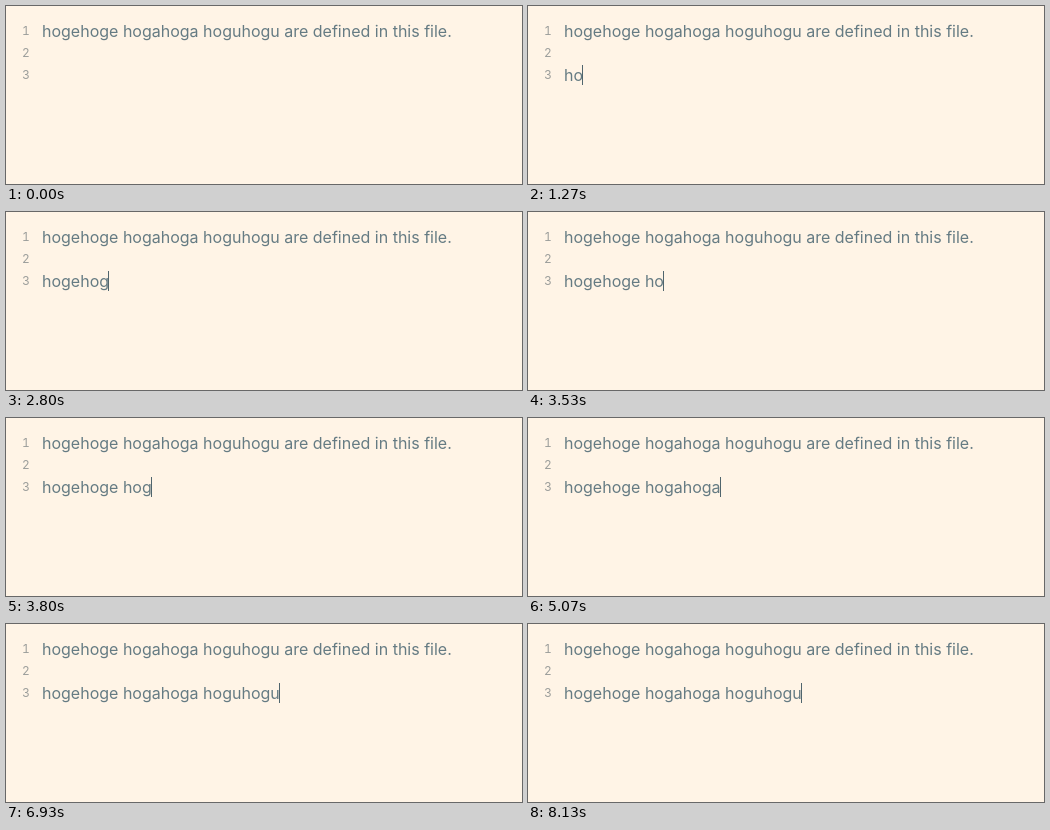
An HTML page that plays this animation: 516 px wide and 178 px high, repeating every 8.59 s.

```html
<!DOCTYPE html>
<html lang="en">
<head>
<meta charset="utf-8">
<title>Word completion in an editor</title>
<style>
  html, body { margin: 0; width: 100%; height: 100%; overflow: hidden; background: #fff4e6; }
  #stage {
    position: relative; width: 516px; height: 178px; overflow: hidden;
    background: #fff4e6; color: #657b83;
    font: 16px/22px Inter, sans-serif;
  }
  #stage > * { position: absolute; }
  .line { left: 36px; white-space: pre; }
  .number {
    left: 10px; width: 20px; text-align: center; color: #9c9e9b;
    font-size: 12px; font-variant-numeric: tabular-nums;
  }
  #caret { top: 59px; width: 1px; height: 20px; background: #50656d; }
  #popup {
    top: 84px; width: 149px; height: 240px; overflow: hidden;
    border: 1px solid #96938c; border-radius: 4px;
    background: #fff4e6; box-shadow: 0 1px 4px rgba(60, 50, 40, .25);
  }
  .item { height: 34px; line-height: 34px; padding-left: 34px; margin-right: 10px; }
  .item:first-child { background: #efe6d8; }
  #bar { position: absolute; top: 0; right: 0; width: 10px; height: 200px; border-radius: 4px; background: #d8cdc1; }
</style>
</head>
<body>
<div id="stage">
  <div class="number" style="top:14px">1</div>
  <div class="number" style="top:36px">2</div>
  <div class="number" style="top:58px">3</div>
  <div class="line" style="top:14px">hogehoge hogahoga hoguhogu are defined in this file.</div>
  <div class="line" style="top:58px" id="typed"></div>
  <div id="caret"></div>
  <div id="popup">
    <div class="item">ho</div>
    <div class="item">how</div>
    <div class="item">hot</div>
    <div id="bar"></div>
  </div>
</div>
<script>
const LOOP = 8590, LEFT = 36;
const TEXT = "hogehoge hogahoga hoguhogu";
// The moment each character of TEXT appears
const KEYS = [
  1130, 1270, 1470, 1530, 1870, 2200, 2800, 2930, 3270,
  3470, 3530, 3800, 3930, 4530, 4670, 4930, 5070, 5330,
  5600, 5730, 6000, 6200, 6470, 6530, 6730, 6930
];
// [start, opacity]
const BLINK = [[0, 0], [470, 1], [1070, .5], [1130, 1], [7400, .5], [7470, 0], [8070, .5], [8130, 1]];
// [start, end, index of the word's first character]
const POPUPS = [[1400, 1530, 0], [3670, 3800, 9], [5870, 6000, 18]];

const [typed, caret, popup] = ["typed", "caret", "popup"].map(id => document.getElementById(id));
const pen = document.createElement("canvas").getContext("2d");
pen.font = "16px Inter, sans-serif";
const xAt = count => LEFT + pen.measureText(TEXT.slice(0, count)).width;

function draw(time) {
  const count = KEYS.filter(key => key <= time).length;
  const text = TEXT.slice(0, count);
  if (typed.textContent !== text) typed.textContent = text;

  caret.style.left = Math.max(LEFT, Math.round(xAt(count) - .6)) + "px";
  caret.style.opacity = BLINK.filter(([start]) => start <= time).pop()[1];

  const open = POPUPS.find(([start, end]) => time >= start && time < end);
  popup.style.display = open ? "block" : "none";
  if (open) popup.style.left = Math.round(xAt(open[2])) + "px";
}

const begin = performance.now();
function tick() {
  draw((performance.now() - begin) % LOOP);
  requestAnimationFrame(tick);
}
tick();
</script>
</body>
</html>
```
